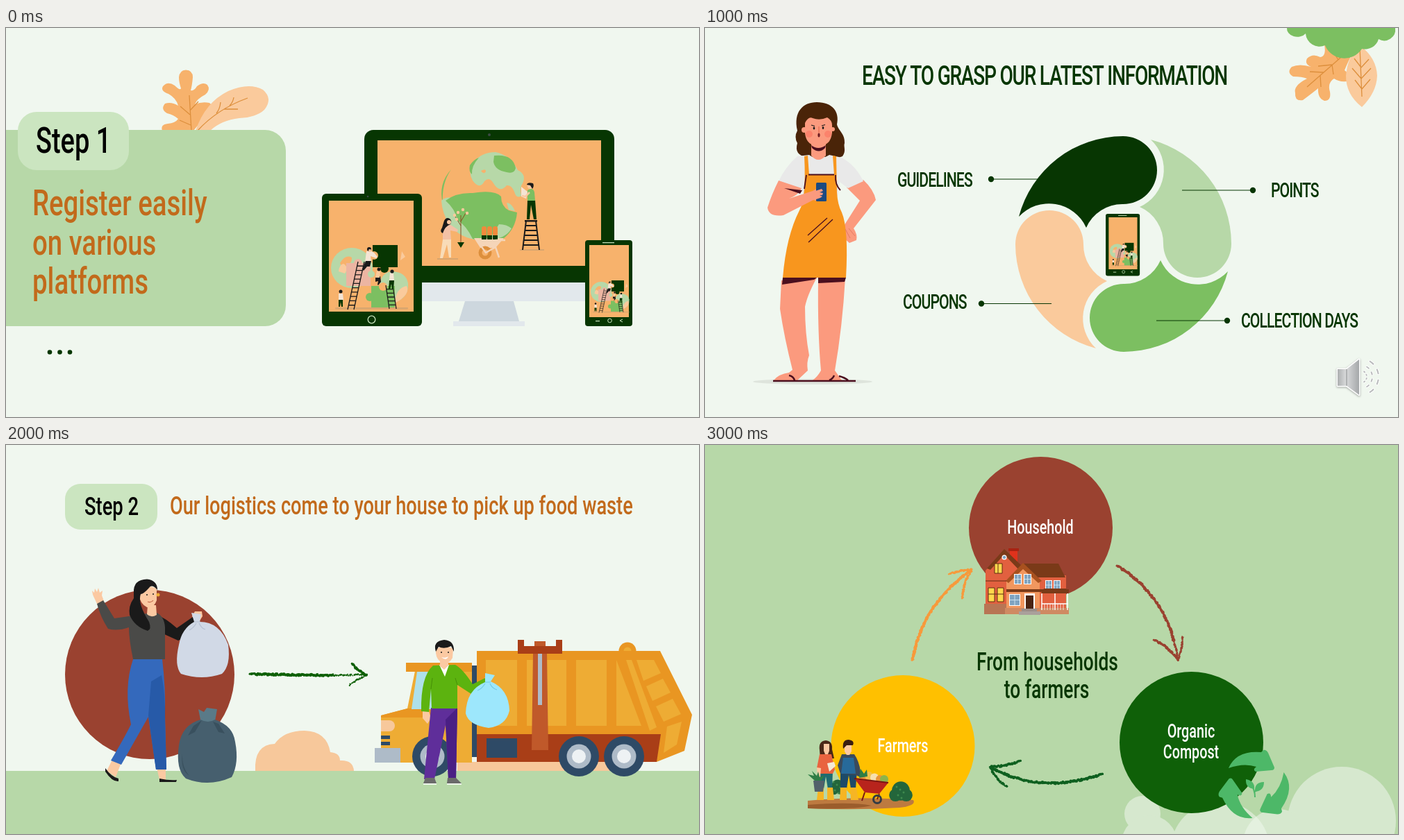
These frames come from a looping animation (998x561 px, 4 s). An HTML page with a canvas:

```html
<!DOCTYPE html>
<html lang="en">
<head>
<meta charset="utf-8">
<title>Food waste steps</title>
<style>
html, body { margin: 0; width: 100%; height: 100%; overflow: hidden; background: #f0f7ef; }
canvas { display: block; width: 998px; height: 561px; }
</style>
</head>
<body>
<canvas id="stage"></canvas>
<script>
const W = 998, H = 561, HOLD = 1000;
const canvas = document.getElementById('stage');
const ctx = canvas.getContext('2d');
const dpr = window.devicePixelRatio || 1;
canvas.width = W * dpr;
canvas.height = H * dpr;

const PALE = '#f0f7ef', MINT = '#b7d8a8', TAG = '#cbe5c0', LEAF = '#7cbf61', DARK = '#073602';
const ORANGE = '#f7b26c', PEACH = '#faca9c', VEIN = '#dd8f3c', RUST = '#c26a1b', BRICK = '#9a4230';
const SKIN = '#fbc9a2', INK = '#1a1a1a', WINE = '#4b0f1e', CORAL = '#fb9a7e';
const AMBER = '#e99622', GOLD = '#eeac34', NAVY = '#2e4a66', STEEL = '#aebbc8', CLAY = '#a93e17';
const CONDENSE = 0.73;

function fill(color, d) {
  ctx.fillStyle = color;
  ctx.fill(new Path2D(d));
}
function line(color, width, d) {
  ctx.strokeStyle = color;
  ctx.lineWidth = width;
  ctx.stroke(new Path2D(d));
}
function dot(color, x, y, rx, ry = rx) {
  ctx.fillStyle = color;
  ctx.beginPath();
  ctx.ellipse(x, y, rx, ry, 0, 0, 7);
  ctx.fill();
}
function ring(color, width, x, y, r, from = 0, to = 7) {
  ctx.strokeStyle = color;
  ctx.lineWidth = width;
  ctx.beginPath();
  ctx.arc(x, y, r, from, to);
  ctx.stroke();
}
function box(color, x, y, w, h, r = 0) {
  ctx.fillStyle = color;
  ctx.beginPath();
  ctx.roundRect(x, y, w, h, r);
  ctx.fill();
}
function text(str, x, y, size, color, align = 'left') {
  ctx.save();
  ctx.translate(x, y);
  ctx.scale(CONDENSE, 1);
  ctx.font = `500 ${size}px Roboto, "Liberation Sans", sans-serif`;
  ctx.letterSpacing = str === str.toUpperCase() ? `${-0.045 * size}px` : '0px';
  ctx.textAlign = align;
  ctx.fillStyle = color;
  ctx.fillText(str, 0, 0);
  ctx.restore();
}
function placed(x, y, scale, draw) {
  ctx.save();
  ctx.translate(x, y);
  ctx.scale(scale, scale);
  draw();
  ctx.restore();
}
function turned(x, y, angle, draw) {
  ctx.save();
  ctx.translate(x, y);
  ctx.rotate(angle);
  ctx.translate(-x, -y);
  draw();
  ctx.restore();
}
// Chalky stroke along a quadratic curve
function brush(color, width, x0, y0, cx, cy, x1, y1) {
  const steps = Math.ceil(Math.hypot(x1 - x0, y1 - y0));
  const noise = n => { const v = Math.sin(n * 12.9898) * 43758.5453; return v - Math.floor(v); };
  for (let i = 0; i <= steps; i++) {
    const t = i / steps, u = 1 - t;
    const x = u * u * x0 + 2 * u * t * cx + t * t * x1;
    const y = u * u * y0 + 2 * u * t * cy + t * t * y1;
    dot(color, x + noise(i) * 1.6 - 0.8, y + noise(i + 500) * 2 - 1, width * (0.3 + 0.22 * noise(i + 900)));
  }
}
// Ladder with rails from (x0,y0) to (x1,y1), second rail shifted by w
function ladder(x0, y0, x1, y1, w, rungs, weight, spread = 0) {
  let d = `M${x0} ${y0}L${x1} ${y1}M${x0 + w + spread} ${y0}L${x1 + w} ${y1}`;
  for (let i = 1; i < rungs; i++) {
    const t = i / rungs, x = x0 + (x1 - x0) * t, y = y0 + (y1 - y0) * t;
    d += `M${x} ${y}h${w + spread * (1 - t)}`;
  }
  line(INK, weight, d);
}

function puzzle() {
  dot(MINT, 498, 346, 30, 29);
  fill(MINT, 'M538 372Q540 352 556 351Q576 352 579 368Q580 386 566 393L550 385Z');
  fill(ORANGE, 'M481 339Q489 326 498 331Q499 341 484 345Z');
  fill(PEACH, 'M479 351Q480 341 486 340Q494 345 488 354Z');
  fill(PEACH, 'M560 397Q561 375 577 372Q583 384 560 397ZM570 322l5 8-7 5Z');
  box('#ecb5a2', 490, 339, 35, 33);
  dot('#ecb5a2', 507, 339, 6);
  dot(MINT, 526, 355, 5);
  box(DARK, 528, 313, 36, 32);
  dot(DARK, 545, 347, 6);
  dot(ORANGE, 530, 328, 6);
  box(LEAF, 526, 372, 34, 33);
  dot(LEAF, 524, 388, 6);
  dot(ORANGE, 543, 373, 6);
  box('#d8a66f', 474, 403, 105, 2.5, 1);
  ladder(492, 406, 507, 337, 9, 11, 1.3);
  ladder(552, 405, 547, 371, 10, 6, 1.3);
  fill('#f5e4d4', 'M519 322Q524 320 530 324L535 330 533 332 525 329 526 337 517 338Z');
  fill(INK, 'M518 336l8 0-2 8-4 0-5 6-2-2Z');
  dot(INK, 523, 319, 3);
  dot(SKIN, 524, 321, 2);
  fill(INK, 'M532 359l7-1 1 8-4 5-1-1 1-5-4 1Z');
  fill(PEACH, 'M534 350l5 1-1 9-6 0Z');
  dot(INK, 537, 348, 2.5);
  fill('#f5e4d4', 'M553 353l5 1 1 10-7 0Z');
  fill(DARK, 'M552 364h7l-1 13h-2l-1-8-2 8h-2Z');
  dot(INK, 556, 351, 2.6);
  fill('#f5e4d4', 'M479 383h6l1 9h-7Z');
  fill(DARK, 'M479 392h6l0 10h-2l-1-7-1 7h-2Z');
  dot(INK, 482, 380, 2.5);
}

function phone() {
  box(DARK, 834, 306, 68, 124, 4);
  box(ORANGE, 840, 313, 57, 104);
  placed(608, 207.5, 0.5, puzzle);
  box(TAG, 859, 309, 17, 1.2);
  box(TAG, 849, 422, 6, 1.2);
  ring(TAG, 1, 869.5, 422, 2.8);
  line(TAG, 1, 'M888 420l-4 2 4 2');
}

function globe() {
  fill(LEAF, 'M641 204Q622 225 629 253Q627 224 641 204Z');
  fill(MINT, 'M672 195Q684 179 705 179Q726 183 737 205Q750 211 744 224Q739 230 742 242Q735 247 732 236Q728 226 721 227Q711 239 702 224Q696 214 689 221Q682 234 672 220Q665 208 672 195Z');
  fill(LEAF, 'M703 184Q730 181 734 202Q732 211 721 208Q704 205 702 193ZM668 198q5-8 13-11-11 12-10 24-5-4-3-13Z');
  fill(ORANGE, 'M684 206q7-4 7 1-3 5-7-1Z');
  fill(MINT, 'M627 249Q634 241 650 247Q672 266 683 306Q654 304 638 283Q628 266 627 249Z');
  fill(LEAF, 'M633 249Q648 237 672 238Q704 233 713 243Q713 257 724 263L736 266Q734 290 716 304Q696 311 672 304Q663 285 650 277Q647 261 633 249Z');
  fill(MINT, 'M721 252q7 0 12 12l-9-2ZM698 302l12-19q11 0 18 6-9 15-30 16Z');
}

function monitor() {
  box('#e2e8ec', 516, 355, 360, 39, [0, 0, 12, 12]);
  box(DARK, 516, 147, 360, 220, [13, 13, 0, 0]);
  box(ORANGE, 535, 162, 322, 181);
  dot('#3d4a45', 696, 154, 2);
  fill('#cdd7de', 'M661 394H731L739 423H652Z');
  box('#e2e8ec', 644, 423, 103, 7);
  globe();
  // gardener
  fill('#f3c1a6', 'M629 284Q635 279 642 285L651 291 650 294 640 292 641 306 629 307Z');
  fill('#f8dcb8', 'M629 305h12l0 26h-3l-3-19-6 20h-4Z');
  fill(INK, 'M631 278q3-6 8-3 4 3 1 8-8 3-11 13-5-2-1-8Z');
  dot(SKIN, 638, 280, 3);
  line('#8a4a20', 1, 'M655 311V270M655 285l-8-13M655 279l7-12');
  fill(DARK, 'M650 309h10l-5 8Z');
  for (const [x, y] of [[646, 270], [651, 266], [658, 262], [664, 267], [649, 276]]) dot(PEACH, x, y, 2.2);
  // cart
  fill('#f5d5b8', 'M674 303h43l-12 14h-22Z');
  for (const x of [689, 697, 705]) {
    box('#f08a3c', x - 4, 286, 7, 14, 3);
    box(DARK, x - 4, 299, 7, 6);
  }
  ring(VEIN, 5, 690, 324, 7);
  line('#f5d5b8', 2.5, 'M683 313l8 11 14-8 5 15M705 306h14');
  box('#d8a66f', 621, 332, 30, 2);
  box('#d8a66f', 740, 319, 35, 2);
  // worker on a ladder
  ladder(744, 320, 749, 278, 14, 6, 2, 10);
  box(INK, 747, 277, 18, 2.5);
  fill(DARK, 'M751 248h11l2 28h-4l-4-21-2 21h-4Z');
  fill(LEAF, 'M751 234q8-5 10 3l1 12h-11Z');
  fill('#f5e4d4', 'M742 229l9 7-2 10-7-3Z');
  line(SKIN, 2.5, 'M754 237l-6 6-5-1');
  dot(SKIN, 755, 228, 4);
  fill(INK, 'M750 226q1-4 9-2 2 4-1 8l-3-5Z');
}

function steps1() {
  fill(ORANGE, 'M225 148Q222 139 233 138Q244 137 248 131Q241 125 232 123Q222 117 229 109Q238 106 248 112Q245 101 234 95Q222 91 226 84Q233 76 243 83Q251 91 252 87Q249 78 249 71Q250 61 259 60.5Q269 61 269 71Q268 83 266 90Q271 91 275 84Q284 77 290 82Q295 89 287 96Q275 102 272 110Q282 106 293 108Q300 113 294 119L270 148Z');
  line(VEIN, 1.3, 'M267 148L264 97M265 125l-14-12M266 140l-16-7M265 119l12-13');
  fill(PEACH, 'M273 148Q287 107 320 91Q350 78 370 89Q385 102 372 118Q360 129 336 130Q310 133 294 148Z');
  line(VEIN, 1.3, 'M276 148Q304 117 348 101M303 123q5-6 6-16M322 112q5-5 6-12M314 117l20 0');
  box(MINT, 0, 147, 403, 283, [0, 30, 30, 0]);
  box(TAG, 17, 121, 160, 84, 27);
  text('Step 1', 43, 180, 52, '#000');
  ['Register easily', 'on various', 'platforms'].forEach((s, i) => text(s, 38, 270 + i * 56.7, 52.5, RUST));
  for (const x of [63, 77.5, 92]) dot(DARK, x, 467.5, 3.3);
  monitor();
  box(DARK, 455, 239, 144, 191, 6);
  box(ORANGE, 465, 249, 122, 160);
  dot('#3d4a45', 521, 243, 1.3);
  ring(TAG, 1.3, 526.5, 420.5, 5.3);
  puzzle();
  phone();
}

function shopper() {
  dot('#dee4dc', 155, 510, 86, 4);
  fill('#4a2408', 'M133 148C127 121 141 107 161 107C184 107 194 121 190 139C192 148 202 153 201 166C199 171 204 177 198 185Q190 189 178 186L146 186Q128 183 133 166Q128 157 133 148Z');
  // legs
  fill(CORAL, 'M110 364L161 360Q147 386 144 402Q144 440 150 472Q146 482 148 494L133 508H99Q106 499 121 497L126 493Q114 446 108 405ZM163 362L202 360Q198 430 187 494L197 508H155Q162 503 167 494Q162 440 163 362Z');
  fill(WINE, 'M112 360H161L157 363 111 370ZM163 360H203L201 366 163 368Z');
  line(WINE, 2.5, 'M98 509H155M154 509H217M121 501q6 1 8 7M186 501q-2 5-7 7M193 502q8 2 13 6');
  // arms and shirt
  fill(CORAL, 'M228 219Q243 233 246 248L214 289Q220 298 218 306L208 310Q197 302 197 290L223 249 204 230Z');
  fill('#e9e9e9', 'M133 185L150 183Q163 193 179 183L197 187Q217 198 228 221L206 231 194 222 191 242H143L138 231 106 221Q116 200 133 185Z');
  fill(CORAL, 'M153 164h21v20q-11 12-21 0Z');
  fill(WINE, 'M153 169q10 8 21 0l-1 4q-9 9-19 0Z');
  fill('#f8961e', 'M143 185l5-1 2 28h36l-2-28 5 1 1 52Q191 255 197 266Q207 290 203 360H112Q117 300 136 263Q146 246 143 185Z');
  line(WINE, 1.8, 'M149 211.5H186M188 212q-1 14 7 22M146 212l-3 20');
  fill(CORAL, 'M106 220L139 231Q135 241 121 246L155 235 162 231 175 235 174 247Q164 251 156 248L113 270Q92 273 90 259Q96 240 106 220Z');
  fill(WINE, 'M114 231l26 3-3 5Z');
  box('#1c4a80', 160, 223, 15, 27, 1.5);
  fill(CORAL, 'M156 236l12-4 2 3-5 2 5 1-1 3-4 0 4 2-3 2-9 3Z');
  line(WINE, 1.3, 'M148 299L176 274M149 309L184 276');
  line('#e47b62', 1, 'M202 290l7 13M207 289l9 11');
  // face
  fill(CORAL, 'M144 137Q149 127 155 130Q165 134 176 129Q183 133 183 140V151Q181 170 164 170Q146 170 144 152Z');
  dot(CORAL, 143, 147, 4);
  dot(CORAL, 184, 146, 3);
  dot('#fb836c', 150, 153, 5);
  dot('#fb836c', 177, 153, 5);
  dot(INK, 157, 144.5, 1.3, 2);
  dot(INK, 170, 144, 1.3, 2);
  line(INK, 1.2, 'M153 140l5 1.5M173 139.5l-5 1.5');
  line('#e4694f', 1.2, 'M164 142v9');
  dot('#6d1c22', 164, 154.5, 1.6, 3);
}

function speaker() {
  const shade = ctx.createLinearGradient(910, 0, 943, 0);
  shade.addColorStop(0, '#a9abac');
  shade.addColorStop(0.4, '#d9dadb');
  shade.addColorStop(1, '#a2a5a7');
  const body = 'M911 492H924L942 478V529L924 516H911Z';
  ctx.save();
  ctx.shadowColor = 'rgba(0,0,0,.35)';
  ctx.shadowBlur = 3;
  ctx.shadowOffsetY = 1;
  line('#fff', 3, body);
  ctx.restore();
  fill(shade, body);
  line('#87898b', 1, 'M924 492V516');
  for (const r of [9, 17, 26]) {
    for (const a of [-0.9, -0.3, 0.3, 0.9]) {
      ring('#fff', 4, 944, 503, r, a - 0.18, a + 0.18);
      ring('#b9bbbc', 2, 944, 503, r, a - 0.15, a + 0.15);
    }
  }
}

function information() {
  fill(ORANGE, 'M892 24Q895 41 886 42Q875 36 867 44Q863 52 873 56Q856 51 845 56Q837 64 847 70Q860 70 867 73Q847 83 850 94Q849 106 861 104Q877 92 883 87Q882 101 892 105Q902 105 900 92Q896 79 906 73Q913 78 924 77Q931 68 921 61Q925 51 932 37Z');
  line(VEIN, 1.3, 'M923 36L867 85M903 53l-20 2M891 64l-20-1M903 53l2 14M886 68l1 17M912 46l-8-13');
  fill(PEACH, 'M946 114Q923 96 923 69Q925 41 943 25Q967 43 968 69Q967 93 946 114Z');
  line(VEIN, 1.3, 'M943 28L946 99M945 57l-10-13M945 73l-13-15M946 88l-10-13M945 57l11-12M945 73l14-15M946 88l12-14');
  fill(LEAF, 'M838 0A15 12 0 0 0 865 8A20 20 0 0 0 893 25A30 30 0 0 0 946 30A20 20 0 0 0 970 16A16 16 0 0 0 994 0Z');
  text('EASY TO GRASP OUR LATEST INFORMATION', 226, 82, 38.5, DARK);
  shopper();
  [DARK, MINT, LEAF, PEACH].forEach((color, i) => turned(602.5, 311.5, i * Math.PI / 2, () =>
    fill(color, 'M452 272A155.5 155.5 0 0 1 602 156A49 49 0 0 1 602 254A57 57 0 0 0 549 288A59 59 0 0 0 452 272Z')));
  for (const [x, y, end] of [[412, 218, 480], [789, 234, 687], [398, 397.5, 499], [752, 422, 650]]) {
    dot(DARK, x, y, 4.2);
    line(DARK, 1.1, `M${x} ${y}H${end}`);
  }
  text('GUIDELINES', 277, 229, 29, DARK);
  text('POINTS', 815, 244, 29, DARK);
  text('COUPONS', 285, 405, 29, DARK);
  text('COLLECTION DAYS', 772, 432, 29, DARK);
  placed(-25.1, 47, 0.722, phone);
  speaker();
}

function wheel(x, y) {
  dot(NAVY, x, y, 29);
  dot(STEEL, x, y, 17.5);
  dot('#eef2f4', x, y, 10);
}

function truck() {
  box('#f7c89b', 650, 457, 235, 13);
  box(NAVY, 668, 318, 12, 132);
  // cab
  fill(GOLD, 'M589 326H671V458H568V438H540V390L578 380Z');
  fill(AMBER, 'M576 314H671V327H576ZM540 390L578 380H612V393H540Z');
  fill('#aee0ea', 'M592 327H616V381H584Z');
  box('#f7c89b', 540, 397, 20, 16, [0, 8, 8, 0]);
  box(NAVY, 540, 419, 13, 5);
  box(NAVY, 540, 428, 13, 5);
  box(STEEL, 531, 437, 37, 21);
  wheel(614, 449);
  // container
  dot(AMBER, 895, 297, 12.5);
  dot(GOLD, 895, 297, 5.5);
  fill(AMBER, 'M678 297H942L988 389L977 441L937 457L920 417H678Z');
  for (const [x, w] of [[691, 45], [750, 57], [821, 44]]) box(GOLD, x, 310, w, 95);
  fill(GOLD, 'M879 310L915 405H879ZM893 310h8l36 97-10 5Z');
  fill(GOLD, 'M908 310H933L943 329 918 340ZM922 348L946 337 957 357 931 369ZM936 377L960 366 972 388 947 399ZM952 406L973 399 966 432 947 444Z');
  fill(CLAY, 'M678 417H943L937 457H678Z');
  box(NAVY, 692, 423, 44, 28);
  fill('#c0592a', 'M759 301H779L781 440H757Z');
  box(STEEL, 766, 300, 6, 75);
  fill(CLAY, 'M737 281H746V290H792V281H801V301H737Z');
  box('#c0592a', 761, 283, 16, 7);
  wheel(825, 449);
  wheel(890, 449);
}

function resident() {
  dot(BRICK, 207, 331, 122);
  fill(SKIN, 'M131 229L125 216 124 210 127 213 128 207 131 212 133 206 135 213 139 210 138 217 141 225ZM154 452l12 6-8 21-13-9ZM217 465h13l0 18h-9ZM268 247l4-7 10 0 1 7-7 11Z');
  fill(INK, 'M143 466Q152 479 162 481V485Q153 486 143 471ZM221 481Q235 484 246 483L245 486H221ZM219 246Q229 249 246 264L269 248 278 257Q258 278 248 282L226 272Z');
  fill('#3469bc', 'M183 309H225Q230 350 229 390L231 468H216L205 392 166 461 151 455Q170 423 180 403Q169 350 183 309Z');
  fill('#275aa8', 'M209 341L224 332Q230 360 229 400L231 468H216L205 390Z');
  fill('#4a4a48', 'M184 246L215 241Q228 246 229 263V309H183Q177 280 177 263Q160 269 147 265Q136 248 131 229L140 224 156 250Z');
  fill(SKIN, 'M204 231h12l1 14q-8 5-14-1ZM192 209Q200 199 217 207L217 224Q213 236 203 234Q193 229 192 217Z');
  fill(INK, 'M184 213Q183 194 203 193.5Q218 195 218 209Q210 200 206 206Q198 215 194 215Q189 228 206 255Q210 266 204 268Q185 262 178 245Q176 232 184 221Z');
  dot(INK, 203, 216, 1);
  dot(INK, 212, 215, 1);
  line('#c46a4c', 1.2, 'M204 226q5 2 8-2');
  dot(GOLD, 219, 216, 2.5);
  fill('#d1d9e6', 'M267 242L281 244 279 255Q308 255 320 288Q324 318 311 330Q282 340 252 330Q242 318 249 288Q253 265 271 255Z');
  line('#b5c0d2', 1.2, 'M271 255l9 0M274 257q-4 7-10 10M278 257q4 8 9 9');
  fill('#5a7a88', 'M277 381L285 385 289 379 304 381 301 398 310 408 273 408 280 396Z');
  fill('#465f6e', 'M280 396Q291 402 301 396Q327 405 330 428Q336 459 325 479Q292 494 259 481Q244 468 249 433Q253 404 280 396Z');
  fill('#39505e', 'M282 397l-10 17-10 5 8-14ZM298 399l8 15 9 2-9-14ZM254 445q-1 20 10 32-13-8-10-32Z');
}

function collector() {
  fill(SKIN, 'M600 383l9 1 3 10-5 8-7-8ZM689 336l6-4 6 3-5 9-6 3Z');
  fill('#5f2e9a', 'M612 379H650L648 482H637L633 404 617 482H602Z');
  fill('#4a1f84', 'M633 396L650 379 648 482H637Z');
  fill('#6a6a6a', 'M604 480H617L620 488H601ZM636 480H648L656 488H635Z');
  line('#fff', 1.5, 'M601 489H620M635 489H656');
  fill('#5cb30f', 'M615 318L647 317Q658 323 672 345L690 336 695 347 670 359 650 346V380H613L612 352 609 385 598 384Q597 334 615 318Z');
  line('#468f08', 1, 'M612 352l2-16M650 346l-3-10');
  fill('#fff', 'M624 317H638L632 334Z');
  fill(SKIN, 'M625 309h12l0 9-6 6-6-5ZM619 295Q630 286 644 294L643 307Q638 316 630 315Q620 311 619 300Z');
  fill(INK, 'M619 298Q614 283 631 281Q646 282 645 298L641 290Q631 295 623 291Z');
  dot(INK, 627, 299, 1);
  dot(INK, 637, 299, 1);
  fill('#fff', 'M627 306q6 2 10-1-3 7-10 1Z');
  fill('#9de7fc', 'M690 329L704 332 698 341Q724 352 725 383Q720 405 695 408Q666 404 662 387Q663 353 690 342Z');
  line('#74cbe6', 1.2, 'M690 342l8 0M690 344q-5 8-11 10M697 344q3 7 10 9');
}

function pickup() {
  box(MINT, 0, 470, W, 91);
  box(TAG, 85, 56, 133, 66, 22);
  text('Step 2', 113, 101, 37.5, '#000');
  text('Our logistics come to your house to pick up food waste', 236, 100, 37.2, RUST);
  fill('#f7c89b', 'M359 470Q357 432 387 431Q400 412 430 412Q462 413 467 443Q481 444 481 455Q500 454 501 470Z');
  resident();
  brush('#0f6008', 4.5, 352, 330, 425, 332, 470, 332);
  brush('#0f6008', 2.4, 466, 332, 490, 332, 518, 331);
  brush('#0f6008', 4, 499, 315, 506, 326, 520, 332);
  brush('#0f6008', 2.4, 520, 332, 508, 336, 495, 346);
  truck();
  collector();
}

function house() {
  const red = '#e2603f', roof = '#7a3a18', glass = '#c9e0ee';
  box('#e0321c', 439, 151, 11, 24);
  box('#a92212', 437, 149, 15, 4);
  fill(red, 'M404 231V181L431 152L455 181V231Z');
  box(red, 478, 188, 42, 48);
  fill(roof, 'M431 150L406 178 411 180 431 158 452 180 458 176ZM458 171H509L519 191H478Z');
  fill('#f1975f', 'M434 237V195L458 174L482 195V237Z');
  fill('#a8511f', 'M458 170L433 196 437 199 458 179 480 199 485 196Z');
  box('#b87554', 402, 229, 32, 15);
  box('#cf8a62', 432, 235, 92, 9);
  for (const x of [408, 421]) box('#ffd84d', x, 206, 9, 20);
  box('#ffd84d', 417, 171, 11, 14);
  line('#5f2c12', 1, 'M408 206h9v20h-9ZM421 206h9v20h-9ZM417 171h11v14h-11ZM422 171v14M408 215h22M404 196h30');
  for (const [x, y, w, h] of [[446, 187, 9, 13], [460, 187, 9, 13], [491, 196, 8, 12], [503, 196, 8, 12], [439, 216, 14, 15]]) {
    box('#fff', x - 1, y - 1, w + 2, h + 2);
    box('#7fa3c0', x, y, w, h);
    line(glass, 1, `M${x + w / 2} ${y}v${h}M${x} ${y + h / 2}h${w}`);
  }
  dot('#fff', 431, 162, 3.5);
  dot('#7fa3c0', 431, 162, 2.3);
  box(roof, 434, 208, 90, 4);
  box('#fff', 460, 214, 15, 23);
  box('#4a2412', 462, 217, 11, 20);
  fill(roof, 'M484 214l4-7h32l4 7Z');
  line('#fff', 1.5, 'M485 214v24M504 214v24M522 214v24M485 229h38');
  line('#fff', 0.8, 'M489 229v9M493 229v9M497 229v9M501 229v9M508 229v9M512 229v9M516 229v9');
  box('#9b8f8a', 456, 236, 22, 4);
  box('#aaa09b', 452, 240, 31, 5);
}

function farmers() {
  fill('#bd7a40', 'M148 513Q220 506 300 512Q305 520 280 523Q215 527 148 524Z');
  fill('#9b5d2c', 'M148 519Q210 514 240 520Q215 526 148 524Z');
  for (const [x, y, r] of [[282, 499, 13], [191, 492, 9]]) {
    dot('#23663b', x, y, r, r * 1.05);
    dot('#23663b', x - r * 0.6, y + 6, r * 0.7);
    dot('#23663b', x + r * 0.6, y + 6, r * 0.7);
    for (let i = 0; i < 5; i++) dot('#3f8a4e', x - 6 + (i * 5) % 13, y - 6 + i * 4, 1.5);
  }
  // woman with a bucket
  fill('#4a2817', 'M165 440Q163 427 174 426Q184 427 183 439L186 452 166 452Z');
  fill('#1f6b70', 'M164 470h20l-1 26h-6l-3-18-3 18h-8Z');
  fill('#f6b524', 'M163 494h8l0 18h-10ZM176 494h8l2 18h-10Z');
  fill('#e9643f', 'M165 446H182L187 468 184 474H164L161 466Z');
  fill(SKIN, 'M171 431h8v10l-2 5h-4l-2-5ZM161 465l6 1-1 13-4-1Z');
  fill('#f4ead6', 'M176 459l10-2 2 6-9 8Z');
  fill('#52606a', 'M156 484h16l-2 16h-12Z');
  fill('#2f7d45', 'M158 484l-10-9 9 2-3-7 7 7 2-6 2 8 7-2-5 7Z');
  // man with a barrow
  fill('#1d4a68', 'M195 468h24l-2 28h-7l-3-20-3 20h-9Z');
  fill('#f6b524', 'M195 494h9l0 18h-10ZM209 494h9l3 18h-11Z');
  fill('#3a4a5c', 'M197 446H215Q222 456 224 471L233 478 230 482 217 476 195 474 191 462Z');
  fill('#276a9a', 'M199 451H214L217 474H196Z');
  fill(SKIN, 'M201 432h10v10l-3 5h-4l-3-5Z');
  fill('#3a1d10', 'M199 438Q197 425 207 425Q216 426 213 433L204 433Z');
  for (const [x, color] of [[228, '#e9943a'], [236, '#f0c04a'], [244, '#f7dfae'], [252, '#e9943a'], [258, '#8bb44c']]) dot(color, x, 482 - (x % 3) * 2.5, 6);
  fill('#2f7d45', 'M222 480l2-13 5 7 4-6 1 10Z');
  fill('#b8241c', 'M216 482L264 487 251 503 230 501Z');
  line('#7a1712', 2, 'M215 481L264 487M230 501l-4 12M251 503l-3 8');
  ring('#333c44', 3, 248, 511, 5.5);
}

function cycle() {
  box(MINT, 0, 0, W, H);
  const cloud = '#d6e8ce';
  dot(cloud, 917, 542, 78);
  dot(cloud, 630, 532, 26);
  dot(cloud, 640, 574, 40);
  dot(cloud, 742, 586, 72);
  dot(cloud, 825, 575, 50);
  ctx.save();
  ctx.clip(new Path2D('M814 586A72 72 0 0 1 670 586A72 72 0 0 1 814 586Z'));
  dot('#e4f1df', 825, 575, 50);
  ctx.restore();
  dot(BRICK, 483.5, 119.5, 103.5, 102.5);
  dot('#ffc000', 285, 434, 103.5, 102);
  dot('#0f6008', 700.5, 429, 103.5, 102);
  text('Household', 483, 128, 27, '#fff', 'center');
  text('Farmers', 285, 443, 27, '#fff', 'center');
  text('Organic', 700, 422, 27, '#fff', 'center');
  text('Compost', 700, 452, 27, '#fff', 'center');
  text('From households', 493, 325, 36, DARK, 'center');
  text('to farmers', 492, 365, 36, DARK, 'center');
  house();
  farmers();
  const flame = '#f79a3c', pine = '#0f6020';
  brush(flame, 4.5, 299, 310, 312, 232, 382, 181);
  brush(flame, 3.5, 352, 186, 368, 180, 384, 180);
  brush(flame, 3.5, 371, 221, 371, 198, 384, 181);
  brush(BRICK, 4.5, 594, 174, 658, 215, 675, 282);
  brush(BRICK, 3, 674, 280, 679, 294, 681, 309);
  brush(BRICK, 4, 647, 281, 667, 290, 681, 310);
  brush(BRICK, 3, 688, 276, 687, 295, 681, 310);
  brush(pine, 4.5, 573, 474, 484, 505, 412, 465);
  brush(pine, 4, 455, 455, 432, 464, 411, 464);
  brush(pine, 3.5, 411, 464, 417, 481, 434, 492);
  const green = '#4db868';
  for (let i = 0; i < 3; i++) {
    turned(792, 492, i * Math.PI * 2 / 3, () =>
      fill(green, 'M754 466Q765 440 801 443L804 440Q808 439 811 444L820 465Q820 469 816 469L793 471Q788 468 794 464Q776 458 754 466Z'));
  }
  fill(green, 'M791 496Q778 495 779 482Q792 484 791 496ZM792 500Q791 486 805 486Q805 499 792 500Z');
  line(green, 2, 'M785 488Q792 496 792 508M800 491l-8 9');
}

const scenes = [steps1, information, pickup, cycle];
const start = performance.now();
let shown = -1;
function tick() {
  const index = Math.floor((performance.now() - start) / HOLD) % scenes.length;
  if (index !== shown) {
    shown = index;
    ctx.setTransform(dpr, 0, 0, dpr, 0, 0);
    ctx.lineJoin = 'round';
    box(PALE, 0, 0, W, H);
    scenes[index]();
  }
  requestAnimationFrame(tick);
}
tick();
</script>
</body>
</html>
```
